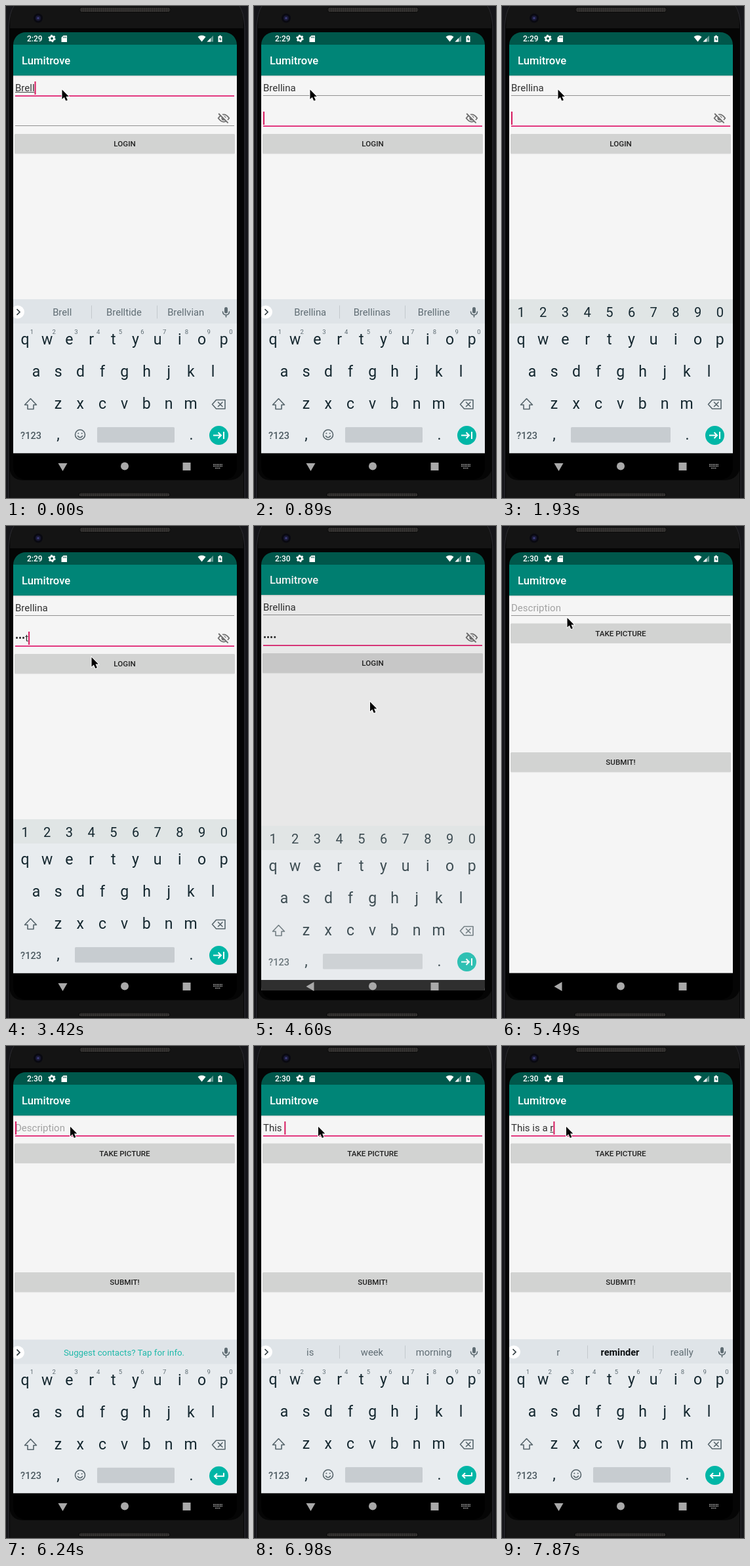
Recreate the animation shown at these times as an HTML page. Size 369 px wide and 750 px high, loop 8 s.

```html
<!DOCTYPE html>
<html lang="en">
<head>
<meta charset="utf-8">
<title>Phone login and post</title>
<style>
html, body { margin: 0; width: 100%; height: 100%; overflow: hidden; background: #111; }
svg { display: block; width: 369px; height: 750px; }
text { font-family: Roboto, sans-serif; white-space: pre; }
.key { font-size: 23px; fill: #14272f; text-anchor: middle; }
.digit { font-size: 20px; fill: #14272f; text-anchor: middle; }
.hint { font-size: 9.5px; fill: #5d6b72; text-anchor: middle; }
.word { font-size: 14.8px; fill: #606d74; text-anchor: middle; }
.label { font-size: 11.6px; font-weight: 500; fill: #202020; text-anchor: middle; }
.field { font-size: 15px; fill: #303030; }
.line { fill: none; stroke: #56646b; stroke-width: 1.6; stroke-linejoin: round; stroke-linecap: round; }
#notice { font-size: 13.3px; fill: #1fb9aa; }
#mouse { paint-order: stroke; }
</style>
</head>
<body>
<svg viewBox="0 0 369 750">
  <defs>
    <clipPath id="screen"><rect x="11" y="40" width="341" height="682" rx="19"/></clipPath>
    <clipPath id="window"><rect id="pane" x="11" y="59" width="341"/></clipPath>
    <pattern id="mesh" width="3" height="3" patternUnits="userSpaceOnUse">
      <rect width="3" height="3" fill="#262524"/><circle cx="1.5" cy="1.5" r=".9" fill="#45423f"/>
    </pattern>
  </defs>

  <rect width="369" height="750" fill="#16161a"/>
  <path d="M5 750V30Q6 8 13 0H355Q362 8 363 30V750Z" fill="#050505"/>
  <path d="M10 0H358Q362 9 362 34H6Q6 9 10 0Z" fill="#141414"/>
  <path d="M4 750V34Q5 10 12 0M364 750V34Q363 10 356 0" fill="none" stroke="#2b2b30"/>
  <path d="M6 708Q9 722 25 723H340Q357 722 362 708V750H6Z" fill="#141414"/>
  <rect x="112" y="2" width="139" height="7.5" rx="3.7" fill="url(#mesh)" stroke="#0a0a0a"/>
  <rect x="111" y="742" width="139" height="6" rx="3" fill="url(#mesh)" stroke="#0a0a0a"/>
  <circle cx="49" cy="18.5" r="7" fill="#090911"/>
  <circle cx="49" cy="18.5" r="4" fill="#191936"/>
  <circle cx="49" cy="18.5" r="1.7" fill="#3c3c79"/>

  <g clip-path="url(#screen)">
    <rect x="11" y="40" width="341" height="682" fill="#000"/>
    <rect x="11" y="40" width="341" height="19" fill="#00574b"/>
    <g clip-path="url(#window)">
      <rect x="11" y="59" width="341" height="663" fill="#f5f5f5"/>
      <g id="page">
        <rect x="11" y="50" width="341" height="56" fill="#008577"/>
        <rect x="11" y="106" width="341" height="1.5" fill="#000" opacity=".12"/>
        <text x="24" y="89" font-size="16.6" font-weight="500" fill="#fff">Lumitrove</text>
        <text id="first" class="field" x="14" y="130"/>
        <rect id="compose" y="131" height="1" fill="#444"/>
        <rect id="firstLine" x="14" width="334"/>
        <g id="login">
          <text id="second" class="field" x="14" y="176"/>
          <rect id="secondLine" x="14" width="334"/>
          <g transform="translate(322 161) scale(.83)" fill="none" stroke="#707070" stroke-width="2.2">
            <path d="M2 12Q12 -1.500 22 12Q12 25.500 2 12Z"/>
            <circle cx="12" cy="12" r="3.200" fill="#707070"/>
            <path d="M4.200 2.200L21 19" stroke="#f5f5f5" stroke-width="3"/>
            <path d="M2.600 3.600L20 21"/>
          </g>
        </g>
        <g id="post"></g>
        <rect id="caret" width="2" height="20" fill="#d81b60"/>
      </g>
    </g>
    <g clip-path="url(#window)">
      <rect id="shade" x="11" y="59" width="341" height="663" fill="#000"/>
      <g id="keyboard"></g>
    </g>

    <g fill="#fff">
      <text id="clock" x="32" y="54" font-size="12" font-weight="500"></text>
      <circle cx="70" cy="49.500" r="3.200" fill="none" stroke="#fff" stroke-width="2.500"/>
      <circle cx="70" cy="49.500" r="4.800" fill="none" stroke="#fff" stroke-width="1.800" stroke-dasharray="2.500 2.526"/>
      <path d="M87.500 45H93V55H84.500V48Z"/>
      <path d="M87.500 46.500V49M89.500 46.500V49M91.300 46.500V49" stroke="#00574b" stroke-width=".8"/>
      <path d="M292.500 47Q298.500 42.500 304.500 47L298.500 54.500Z"/>
      <path d="M316 45V54.500H306.500Z" opacity=".4"/><path d="M312 49V54.500H306.500Z"/>
      <path d="M324 46H325.300V44.700H327.700V46H329.500V55H323.500V46Z"/>
      <path d="M327 47L325 51H326.500V54L328.300 50H327Z" fill="#00574b"/>
    </g>

    <g fill="#a9a9a9">
      <path id="down" d="M79.500 697H93.500L86.500 709Z"/>
      <path id="back" d="M91.500 695V709L79.500 702Z"/>
      <circle cx="181" cy="701.500" r="6"/>
      <rect x="269.500" y="696" width="12" height="12"/>
      <path id="switcher" d="M316 699H330M316 701.500H330M319 704.500H327" fill="none"
        stroke="#a0a0a0" stroke-width="1.500" stroke-dasharray="1.700 .8"/>
    </g>
  </g>
  <path id="mouse" d="M0 0V14.500L3.300 11.500L5.800 17L8.400 15.900L6 10.500H10.300Z" fill="#000" stroke="#fff" stroke-width="1.800"/>
</svg>

<script>
const $ = id => document.getElementById(id);
const label = (cls, x, y, s) => `<text class="${cls}" x="${x}" y="${y}">${s}</text>`;
const row = (cls, chars, x, y) =>
  [...chars].map((c, i) => label(cls, x + i * 33.7, y, c)).join("");
const button = (y, s) =>
  `<rect x="13" y="${y + 1}" width="336" height="29.500" rx="1.500" fill="#000" opacity=".12"/>
   <rect x="13" y="${y}" width="336" height="29.500" rx="1.500" fill="#d2d3d2"/>` +
  label("label", 181, y + 19, s);

$("login").insertAdjacentHTML("beforeend", button(195, "LOGIN"));
$("post").innerHTML = button(148.500, "TAKE PICTURE") + button(345, "SUBMIT!");
$("keyboard").innerHTML = `
  <rect x="11" y="447" width="341" height="235" fill="#e8ecef"/>
  <rect x="11" y="682" width="341" height="60" fill="#000"/>
  <rect id="strip" x="11" y="447" width="341" height="37"/>
  ${row("key", "qwertyuiop", 29, 516)}${row("key", "asdfghjkl", 46, 565)}${row("key", "zxcvbnm", 79.500, 614)}
  <path class="line" d="M37.500 598.500L28.500 608H33V614.500H42V608H46.500Z"/>
  <path class="line" d="M320.500 600.500H334V614H320.500L314.500 607.300ZM323.500 604L330 610.500M330 604L323.500 610.500"/>
  <text x="38" y="659.500" font-size="14.500" font-weight="500" fill="#4b5960" text-anchor="middle">?123</text>
  ${label("key", 79.500, 661, ",")}${label("key", 282.500, 661, ".")}
  <rect id="space" y="642" height="23.500" rx="1.500" fill="#c7ccd0"/>
  <circle cx="324.500" cy="654.500" r="14.500" fill="#00b6a6"/>
  <g fill="none" stroke="#fff" stroke-width="2">
    <path id="next" d="M316 654.500H328M323.500 650L328 654.500L323.500 659M332 649V660"/>
    <path id="enter" d="M332 650V655H318M322 651L318 655L322 659"/>
  </g>
  <g id="digits">${row("digit", "1234567890", 29, 474)}</g>
  <g id="letters">
    ${row("hint", "1234567890", 39.500, 499.500)}
    <circle cx="18" cy="466.500" r="10" fill="#fff"/>
    <path d="M16.500 462L21 466.500L16.500 471" fill="none" stroke="#303b40" stroke-width="1.700"/>
    <rect x="333" y="459" width="5" height="9.500" rx="2.500" fill="#5f6c73"/>
    <path class="line" d="M330.500 466Q331 471 335.500 471Q340 471 340.500 466M335.500 471V474"/>
    <circle class="line" cx="113" cy="653.500" r="7.500"/>
    <path class="line" d="M109.500 655.500Q113 660 116.500 655.500"/>
    <path d="M110.300 651.500V651.600M115.700 651.500V651.600" stroke="#56646b" stroke-width="2" stroke-linecap="round"/>
    <path id="bars" d="M130.500 456.500V476.500M230.500 456.500V476.500" stroke="#c3c9cd"/>
    ${[0, 1, 2].map(i => `<text id="word${i}" class="word" x="${85.700 + i * 94.250}" y="472"></text>`).join("")}
    <text id="notice" class="word" x="180" y="471">Suggest contacts? Tap for info.</text>
  </g>`;

// Each step changes part of the state and holds until the next.
const steps = [
  [0, { page: "login", clock: "2:29", first: "Brell", from: 0, second: "", focus: 1, caret: 1, board: "letters",
        drop: 0, alpha: 1, floor: 681.5, words: "Brell|Brelltide|Brellvian", bold: 0, shift: 0, shade: 0, nav: "down" }],
  [140, { first: "Brelli", words: "Brelli|Brellian|Brelline" }],
  [290, { first: "Brellin", words: "Brellin|Brellina|Brelling" }],
  [440, { first: "Brellina", words: "Brellina|Brellinas|Brelline" }],
  [890, { focus: 2, from: -1 }],
  [1030, { board: "digits" }],
  [1330, { caret: 0 }],
  [1930, { caret: 1 }],
  [2220, { caret: 0 }],
  [2520, { caret: 1, second: "•e" }],
  [2970, { second: "••s" }],
  [3270, { second: "•••t" }],
  [3860, { caret: 0, clock: "2:30" }],
  [4310, { caret: 1 }],
  [4600, { second: "••••", caret: 0, drop: 10, alpha: .8, floor: 708, shift: -1, shade: .054, nav: "back" }],
  [4750, { page: "post", first: "", focus: 0, board: "", floor: 681.5, shift: 5, shade: 0 }],
  [4900, { shift: 1 }],
  [5050, { shift: 0 }],
  [5940, { focus: 1, caret: 1 }],
  [6090, { board: "letters", drop: 45, alpha: .7, words: "", nav: "down" }],
  [6230, { drop: .7, alpha: 1 }],
  [6390, { drop: 0 }],
  [6530, { first: "T", from: 0, words: "T|The|This" }],
  [6680, { first: "Th", words: "Th|The|This" }],
  [6830, { first: "This", words: "This|This is|Thisted" }],
  [6980, { first: "This ", from: -1, words: "is|week|morning" }],
  [7270, { first: "This i", from: 5, words: "i|is|in", bold: 1 }],
  [7420, { first: "This is", words: "is|us|isn't", bold: 0 }],
  [7570, { first: "This is ", from: -1, words: "the|a|my" }],
  [7720, { first: "This is a", from: 8, words: "a|and|an" }],
  [7870, { first: "This is a r", from: 10, words: "r|reminder|really", bold: 1 }]
];

const path = [[0, 85.5, 127.5], [3270, 85.5, 127.5], [3420, 130.5, 200], [3720, 175, 211], [4310, 177, 213],
  [4600, 177, 268], [5490, 99.5, 140], [5790, 98, 123], [8000, 98, 123]];
const ticks = [3270, 4450, 5640].flatMap(start =>
  Array.from({ length: 8 }, (_, i) => Math.round((start + i * 1040 / 7) / 10) * 10));

function mouseAt(t) {
  const now = ticks.filter(x => x <= t).pop() || 0;
  const i = Math.max(1, path.findIndex(p => p[0] > now));
  const [a, b] = [path[i - 1], path[i]];
  const k = (now - a[0]) / (b[0] - a[0]), ease = k * k * (3 - 2 * k);
  return [1, 2].map(j => a[j] + (b[j] - a[j]) * ease);
}

const show = (id, on) => $(id).style.display = on ? "" : "none";
const set = (id, attrs) => { for (const k in attrs) $(id).setAttribute(k, attrs[k]); };
const width = (id, n) => n > 0 ? $(id).getSubStringLength(0, n) : 0;
const underline = (id, y, on) =>
  set(id, { y: on ? y + .3 : y, height: on ? 1.7 : 1, fill: on ? "#e0196b" : "#929292" });

function draw(s) {
  const login = s.page === "login", letters = s.board === "letters";
  const hint = !login && !s.first;
  show("login", login);
  show("post", !login);
  $("clock").textContent = s.clock;
  $("first").textContent = hint ? "Description" : s.first;
  $("first").style.fill = hint ? "#a2a2a2" : "";
  $("second").textContent = s.second;
  underline("firstLine", 136, s.focus === 1);
  underline("secondLine", 182, s.focus === 2);
  set("page", { transform: `translate(0 ${s.shift})` });
  set("pane", { height: s.floor - 59 });
  set("shade", { opacity: s.shade });

  const end = hint ? 0 : width("first", s.first.length);
  const start = width("first", s.from);
  show("compose", s.from >= 0 && !hint);
  set("compose", { x: 14 + start, width: Math.max(0, end - start) });
  show("caret", s.caret && s.focus);
  set("caret", s.focus === 2
    ? { x: 14 + width("second", s.second.length), y: 161 }
    : { x: 14 + end, y: 115 });

  show("down", s.nav === "down");
  show("switcher", s.nav === "down");
  show("back", s.nav === "back");
  show("keyboard", s.board);
  if (!s.board) return;
  set("keyboard", { transform: `translate(0 ${s.drop})`, opacity: s.alpha });
  show("letters", letters);
  show("digits", !letters);
  show("next", login);
  show("enter", !login);
  set("strip", { fill: letters ? "#dfe4e8" : "#e0e5e5" });
  set("space", letters ? { x: 139, width: 118 } : { x: 105, width: 152 });
  show("notice", !s.words);
  show("bars", s.words);
  const words = s.words.split("|");
  [0, 1, 2].forEach(i => $("word" + i).textContent = words[i] || "");
  $("word1").style.cssText = s.bold ? "font-weight:700;fill:#0b0f11;font-size:14.5px" : "";
}

let last = -1;
function frame() {
  const t = performance.now() % 8000;
  const due = steps.filter(step => step[0] <= t);
  if (due.length !== last) {
    last = due.length;
    draw(Object.assign({}, ...due.map(step => step[1])));
  }
  set("mouse", { transform: `translate(${mouseAt(t)})` });
  requestAnimationFrame(frame);
}
frame();
</script>
</body>
</html>
```
